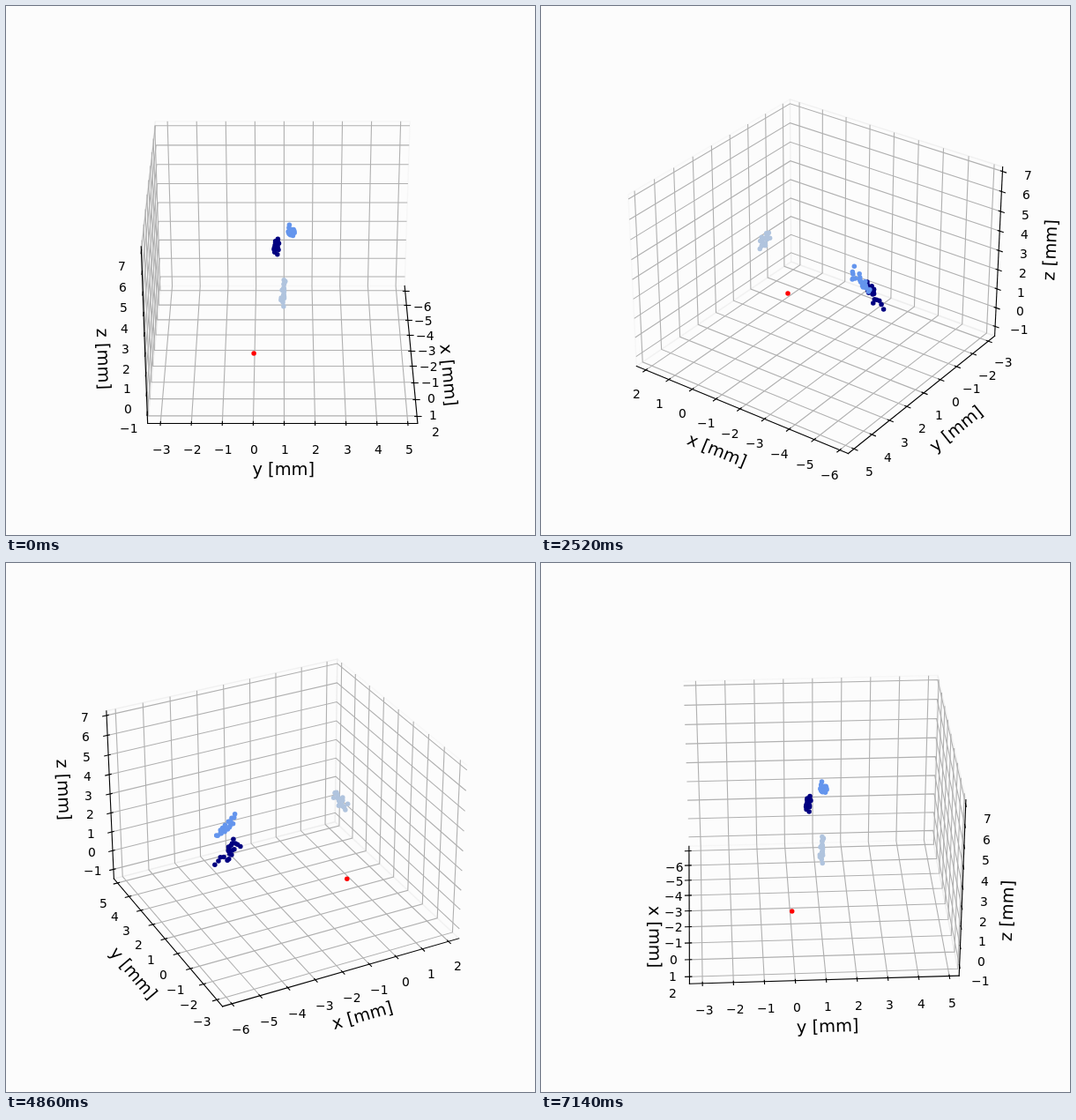
These frames come from a looping animation (600 px wide and 600 px high, 7.2 s). An HTML page with a canvas:

```html
<!DOCTYPE html>
<html lang="en">
<head>
<meta charset="utf-8">
<title>Rotating 3D scatter plot</title>
<style>
  html, body { margin: 0; width: 100%; height: 100%; overflow: hidden; background: #fcfcfc; }
  canvas { display: block; width: 600px; height: 600px; }
</style>
</head>
<body>
<canvas id="plot" width="600" height="600"></canvas>
<script>
const ctx = document.getElementById('plot').getContext('2d');

// Timing: one turn in 120 steps
const STEP = 60, STEPS = 120;

// Camera
const ELEV = Math.PI / 6, DIST = 10, SCALE = 462 / 0.185;
const CX = 313.74, CY = 296.76;

// The box spans RANGE mm on each axis and is lower than it is wide
const RANGE = 8.735;
const FLAT = 0.595238, TALL = FLAT * 0.75;
const AXES = [
  { name: 'x [mm]', mid: -1.961, first: -6, half: FLAT, tickDir: 1, pane: 242 },
  { name: 'y [mm]', mid: 0.95, first: -3, half: FLAT, tickDir: 0, pane: 230 },
  { name: 'z [mm]', mid: 2.856, first: -1, half: TALL, tickDir: 0, pane: 236 }
];
const TICKS = 9;

// Label distances, as parts of the box
const UNIT = 0.16, PER_POINT = 48 / 665.28;
const TICK_PAD = 11.5 * PER_POINT, NAME_PAD = 25 * PER_POINT;
const TICK_FONT = '13.889px "DejaVu Sans", sans-serif';
const NAME_FONT = '19.444px "DejaVu Sans", sans-serif';

let seed = 7;
function random() {
  seed = (seed * 16807) % 2147483647;
  return seed / 2147483647;
}

// Points strewn around a short line through a centre, all in mm
function cluster(color, center, along, blur, count) {
  const points = Array.from({ length: count }, (_, n) => {
    const t = (2 * n + 1) / count - 1;
    const loose = [0.2, 0.1, 0.27].map(s => s * blur * (2 * random() - 1));
    return center.map((c, i) => toView(c + along[i] * t + loose[i], i));
  });
  return { color, points, center: center.map(toView) };
}

const CLUSTERS = [
  cluster('navy', [-4.04, 0.74, 2.34], [0.32, 0.02, 0.43], 1, 20),
  cluster('cornflowerblue', [-3.89, 1.23, 3.23], [0.3, 0.05, 0.38], 1, 20),
  cluster('lightsteelblue', [0.21, 0.96, 3.33], [-0.2, 0.03, 0.43], 0.6, 20),
  cluster('red', [0, 0, 0], [0, 0, 0], 0, 1)
];

function toView(value, i) {
  return (value - AXES[i].mid) * 2 * AXES[i].half / RANGE;
}

const withValue = (p, i, v) => p.map((c, k) => k === i ? v : c);

function camera(azim) {
  const s = Math.sin(azim), c = Math.cos(azim);
  const se = Math.sin(ELEV), ce = Math.cos(ELEV);
  const depth = ([x, y, z]) => ce * (c * x + s * y) + se * z;
  const project = p => {
    const k = SCALE / (DIST - depth(p));
    const right = -s * p[0] + c * p[1];
    const up = -se * (c * p[0] + s * p[1]) + ce * p[2];
    return [CX + k * right, CY - k * up];
  };
  return { depth, project };
}

function stroke(points, color, width) {
  ctx.strokeStyle = color;
  ctx.lineWidth = width;
  ctx.beginPath();
  points.forEach(([x, y]) => ctx.lineTo(x, y));
  ctx.stroke();
}

// Level or upright lines sit on whole pixels
function strokeSnapped(a, b) {
  for (const i of [0, 1]) {
    if (Math.abs(a[i] - b[i]) < 1e-3) a[i] = b[i] = Math.round(a[i]) + 0.5;
  }
  stroke([a, b], '#000', 1.11);
}

// Moves a point away from the box centre on every axis but one
function pushOut(p, axis, pad) {
  return p.map((c, i) => i === axis ? c : c + Math.sign(c) * pad * UNIT * AXES[i].half);
}

const tickPoint = (edge, axis, n) =>
  withValue(edge, axis, toView(AXES[axis].first + n, axis));

function drawPane(axis, far, project) {
  const [a, b] = [0, 1, 2].filter(i => i !== axis);
  const near = far.map(v => -v);
  const low = far.map((v, i) => i === axis ? v : -AXES[i].half);
  const high = far.map((v, i) => i === axis ? v : AXES[i].half);
  const corners = [low, withValue(low, a, high[a]), high, withValue(low, b, high[b])];
  const tone = AXES[axis].pane;
  stroke(corners.map(project), `rgba(${tone},${tone},${tone},0.5)`, 1.39);
}

function drawGrid(axis, far, near, project) {
  const a = (axis + 1) % 3, b = (axis + 2) % 3;
  for (let n = 0; n < TICKS; n++) {
    const p = tickPoint(far, axis, n);
    const path = [withValue(p, a, near[a]), p, withValue(p, b, near[b])];
    stroke(path.map(project), '#b0b0b0', 1.11);
  }
}

function drawTickLabel(text, [x, y]) {
  const left = x - ctx.measureText(text).width / 2 + 1.1;
  ctx.fillText(text, Math.round(left), Math.round(y + 11));
}

function drawName(text, [x, y], from, to) {
  let angle = Math.atan2(to[1] - from[1], to[0] - from[0]);
  if (angle >= Math.PI / 2) angle -= Math.PI;
  if (angle < -Math.PI / 2) angle += Math.PI;
  ctx.save();
  ctx.translate(x + 1, y + 1);
  ctx.rotate(angle);
  ctx.textAlign = 'center';
  ctx.fillText(text, 0, 5.5);
  ctx.restore();
}

function drawAxis(axis, far, near, project) {
  const side = axis === 0 ? 1 : 0;
  const edge = withValue(far, side, near[side]);
  const start = project(withValue(edge, axis, far[axis]));
  const end = project(withValue(edge, axis, near[axis]));
  const dir = AXES[axis].tickDir;
  const inward = far[dir] * UNIT;

  ctx.fillStyle = '#000';
  ctx.lineCap = 'square';
  ctx.font = NAME_FONT;
  const middle = withValue(edge, axis, 0);
  drawName(AXES[axis].name, project(pushOut(middle, axis, NAME_PAD)), start, end);
  strokeSnapped(start, end);

  ctx.font = TICK_FONT;
  for (let n = 0; n < TICKS; n++) {
    const p = tickPoint(edge, axis, n);
    strokeSnapped(
      project(withValue(p, dir, p[dir] + 0.1 * inward)),
      project(withValue(p, dir, p[dir] - 0.2 * inward)));
    const text = String(AXES[axis].first + n).replace('-', '\u2212');
    drawTickLabel(text, project(pushOut(p, axis, TICK_PAD)));
  }
  ctx.lineCap = 'butt';
}

function drawCluster({ color, points }, project) {
  ctx.fillStyle = color;
  for (const p of points) {
    const [x, y] = project(p);
    ctx.beginPath();
    ctx.arc(x, y, 2.75, 0, 2 * Math.PI);
    ctx.fill();
  }
}

function draw(step) {
  const azim = step * 2 * Math.PI / STEPS;
  const { depth, project } = camera(azim);
  const far = [
    Math.cos(azim) < 0 ? FLAT : -FLAT,
    Math.sin(azim) < 0 ? FLAT : -FLAT,
    -TALL
  ];
  const near = far.map(v => -v);

  ctx.fillStyle = '#fcfcfc';
  ctx.fillRect(0, 0, 600, 600);
  for (const part of [drawPane, drawGrid, drawAxis]) {
    AXES.forEach((_, i) => {
      if (part === drawPane) part(i, far, project);
      else part(i, far, near, project);
    });
  }
  CLUSTERS.slice()
    .sort((a, b) => depth(a.center) - depth(b.center))
    .forEach(c => drawCluster(c, project));
}

let shown = -1;
function tick() {
  const step = Math.floor(performance.now() / STEP) % STEPS;
  if (step !== shown) draw(shown = step);
  requestAnimationFrame(tick);
}
tick();
</script>
</body>
</html>
```
